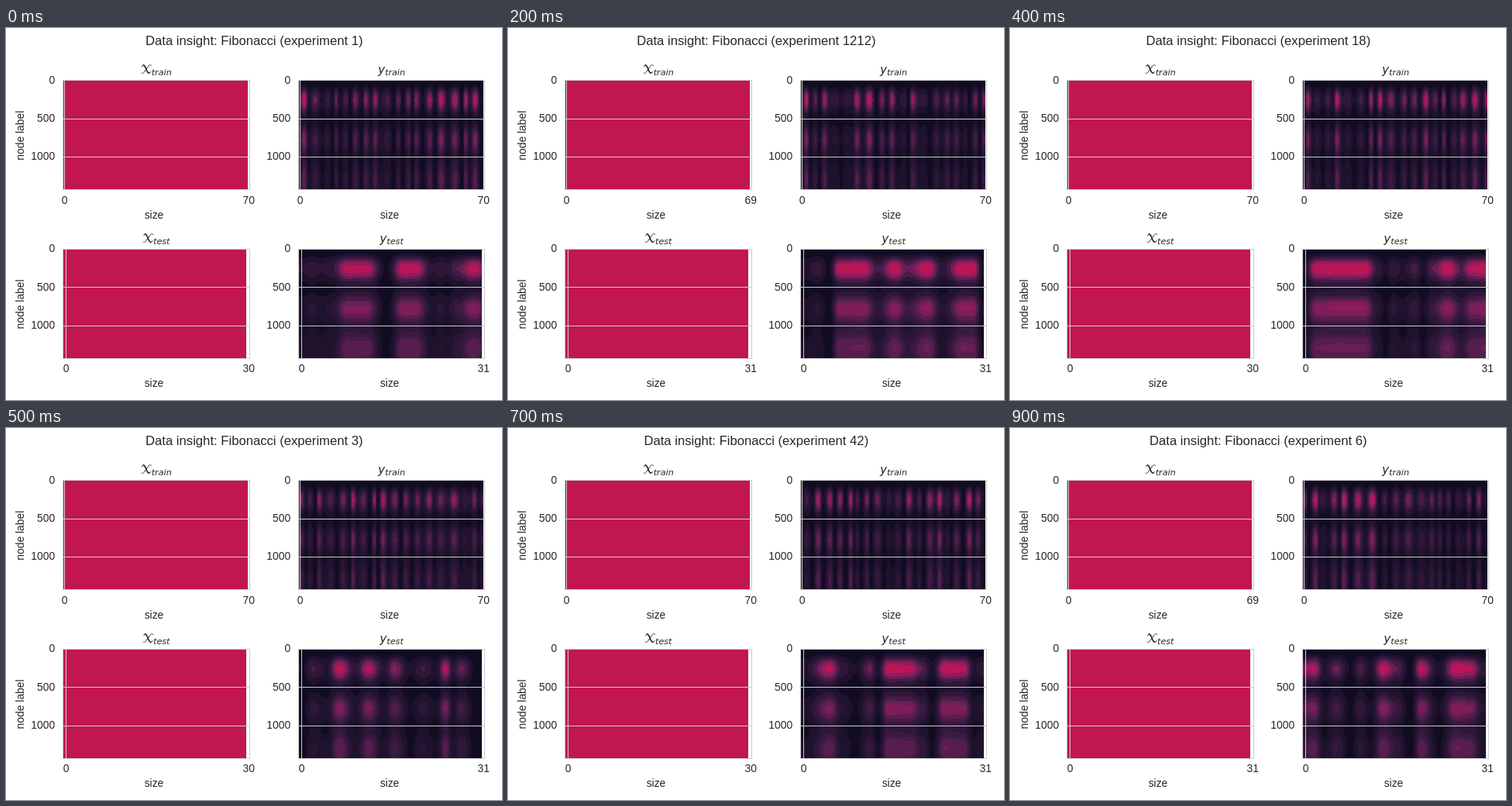
These frames come from a looping animation (640 by 480 pixels, 1 s). An HTML page with a canvas:

```html
<!DOCTYPE html>
<html lang="en">
<head>
<meta charset="utf-8">
<title>Data insight</title>
<style>
html, body { margin: 0; width: 100%; height: 100%; overflow: hidden; background: #fff; }
canvas { display: block; }
</style>
</head>
<body>
<canvas id="stage" width="640" height="480"></canvas>
<script>
const ctx = document.getElementById('stage').getContext('2d');
const STEP = 100, ROWS = 141, LABELS = 1430;
const SANS = '"Liberation Sans", Arial, sans-serif';
const MATH = '"DejaVu Sans", sans-serif';
const INK = '#262626', LINE = '#cccccc', RED = '#c1164f';
const RAMP = [[18, 12, 34], [31, 18, 45], [46, 23, 57], [69, 28, 71],
  [105, 31, 85], [146, 28, 91], [185, 22, 87]];

function random(seed) {
  return () => {
    seed = (seed + 0x6D2B79F5) | 0;
    let t = Math.imul(seed ^ (seed >>> 15), 1 | seed);
    t = (t + Math.imul(t ^ (t >>> 7), 61 | t)) ^ t;
    return ((t ^ (t >>> 14)) >>> 0) / 4294967296;
  };
}

// Waves over the node labels: they lose contrast and grow stripes further down.
function wave(row) {
  const u = (row + 0.5) / ROWS;
  const swing = Math.exp(-1.8 * u) * Math.cos(2 * Math.PI * u * LABELS / 520);
  const stripe = 0.09 * Math.min(1, Math.max(0, (u - 0.3) * 3));
  return (0.6 - 0.05 * u) * (1 - swing) * (1 + (row % 2 ? -stripe : stripe));
}

// Strength per pixel column: random crests and troughs in turn, eased between,
// with full-height crests at the given places.
function strengths(width, cell, top, crests, rnd) {
  const knots = crests.map(x => [x, 0.85 + 0.15 * rnd()]);
  let high = false;
  for (let x = -2 * cell; x < width + 5 * cell; x += cell * (1.2 + 1.6 * rnd())) {
    high = !high;
    const h = high ? 0.35 + (top - 0.35) * rnd() : 0.08 + 0.25 * rnd();
    if (crests.every(c => Math.abs(c - x) > 1.6 * cell)) knots.push([x, h]);
  }
  knots.sort((a, b) => a[0] - b[0]);
  let i = 0;
  return Array.from({ length: width }, (_, x) => {
    while (knots[i + 1][0] <= x) i++;
    const [[x0, a], [x1, b]] = [knots[i], knots[i + 1]];
    return a + (b - a) * (1 - Math.cos(Math.PI * (x - x0) / (x1 - x0))) / 2;
  });
}

function heatmap(columns) {
  const map = document.createElement('canvas');
  map.width = columns.length;
  map.height = ROWS;
  const g = map.getContext('2d');
  const img = g.createImageData(map.width, ROWS);
  let k = 0;
  for (let y = 0; y < ROWS; y++) {
    const w = wave(y);
    for (const a of columns) {
      const level = Math.min(RAMP.length - 1, Math.floor(a * w * RAMP.length));
      img.data.set(RAMP[level], k);
      img.data[k + 3] = 255;
      k += 4;
    }
  }
  g.putImageData(img, 0, 0);
  return map;
}

function shot(id, trainEnd, crests = []) {
  const rnd = random(id);
  return {
    id, trainEnd, testEnd: 100 - trainEnd,
    train: heatmap(strengths(238, 3.4, 0.95, [], rnd)),
    test: heatmap(strengths(236, 7.6, crests.length ? 0.65 : 0.95, crests, rnd))
  };
}

const shots = [
  shot(1, 70, [62, 87, 134, 150, 225]),
  shot(12, 70),
  shot(1212, 69, [49, 80, 121, 163, 208, 222]),
  shot(17, 69, [10, 102, 140, 175, 197]),
  shot(18, 70, [18, 45, 79, 186, 217, 234]),
  shot(3, 70),
  shot(4, 70, [11, 66, 110, 160, 228]),
  shot(42, 70, [37, 112, 140, 185, 210]),
  shot(5, 70),
  shot(6, 69, [14, 103, 152, 197, 216])
];

function text(s, x, y, size = 13.89, align = 'center') {
  ctx.font = size + 'px ' + SANS;
  ctx.textAlign = align;
  ctx.fillText(s, x, y);
}

function rotated(s, x, y) {
  ctx.save();
  ctx.translate(x, y);
  ctx.rotate(-Math.PI / 2);
  text(s, 0, 0);
  ctx.restore();
}

function stroke(width, path) {
  ctx.lineWidth = width;
  ctx.stroke(new Path2D(path));
}

function scriptX(x, y) {
  ctx.save();
  ctx.translate(x, y);
  ctx.strokeStyle = INK;
  ctx.lineCap = 'round';
  stroke(1.7, 'M3.2 -11.2C6.4 -11 6.6 -1.2 10.2 -0.8');
  stroke(1, 'M1.4 -9.2C1.6 -10.8 2.4 -11.3 3.4 -11.2M10 -0.8C11.4 -0.5 12.2 -1.2 12.4 -2.4');
  stroke(1, 'M13.2 -10.6C12.4 -12.2 10.6 -11.4 9.4 -9.6L4.2 -2.4C2.8 -0.4 1.4 0.4 0.8 -1');
  ctx.restore();
}

function mathTitle(name, sub, mid, y) {
  const big = `italic 15.3px ${MATH}`, small = `italic 11.2px ${MATH}`;
  ctx.textAlign = 'left';
  ctx.font = small;
  const subWidth = ctx.measureText(sub).width;
  ctx.font = big;
  const width = name === 'X' ? 13.5 : ctx.measureText(name).width;
  const x = mid - (width + subWidth) / 2;
  if (name === 'X') scriptX(x, y);
  else ctx.fillText(name, x, y);
  ctx.font = small;
  ctx.fillText(sub, x + width, y + 2);
}

function panel({ x, top, right, fill, width, zero, end, name, sub }) {
  const y = Math.round(top), w = right - x;
  const at = d => Math.floor(top + d);
  if (fill) ctx.drawImage(fill, x, y);
  else {
    ctx.fillStyle = RED;
    ctx.fillRect(x, y, width, ROWS);
  }
  ctx.fillStyle = LINE;
  ctx.fillRect(zero, y, 1, ROWS);
  for (const i of [1, 2]) ctx.fillRect(x, at(i * 49.2), w, 1);
  ctx.strokeStyle = LINE;
  ctx.lineWidth = 1;
  ctx.strokeRect(x - 0.5, y - 0.5, w + 1, ROWS);

  ctx.fillStyle = INK;
  mathTitle(name, sub, x + w / 2, Math.round(top - 8.5));
  for (const i of [0, 1, 2]) text(i * 500, x - 10.8, at(4.3 + i * 49.2), 13.89, 'right');
  text(0, zero + 0.5, at(159.3));
  text(end, right - 0.7, at(159.3));
  text('size', x + 117, at(178.1));
}

function draw(time) {
  const s = shots[Math.floor(time / STEP) % shots.length];
  ctx.fillStyle = '#fff';
  ctx.fillRect(0, 0, 640, 480);
  ctx.fillStyle = INK;
  text(`Data insight: Fibonacci (experiment ${s.id})`, 320.3, 22, 16.67);
  const rows = [
    { sub: 'train', top: 67.9, width: 238, inset: 1, endX: s.trainEnd, endY: 70, fill: s.train },
    { sub: 'test', top: 285.6, width: 236, inset: 3, endX: s.testEnd, endY: 31, fill: s.test }
  ];
  for (const { sub, top, width, inset, endX, endY, fill } of rows) {
    rotated('node label', 23, top + 70.8);
    panel({ x: 74, right: 314, top, width, zero: 74 + inset, end: endX, name: 'X', sub });
    panel({ x: 378, right: 617, top, fill, zero: 378 + inset, end: endY, name: 'y', sub });
  }
}

const start = performance.now();
function loop() {
  draw(performance.now() - start);
  requestAnimationFrame(loop);
}
loop();
</script>
</body>
</html>
```
